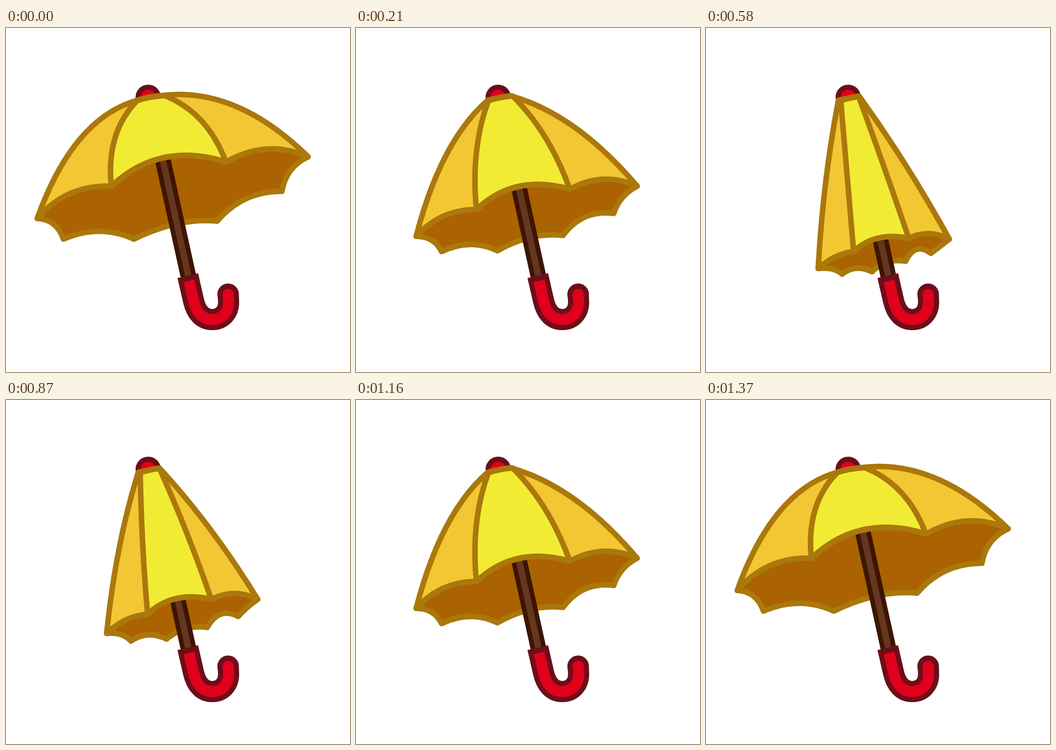
These frames come from a looping animation (748 px wide and 748 px high, 1660 ms). An HTML page without scripts:

```html
<!DOCTYPE html>
<html lang="en">
<head>
<meta charset="utf-8">
<title>Umbrella</title>
<style>
  html, body { margin: 0; width: 100%; height: 100%; overflow: hidden; background: #fff; }
  svg { display: block; width: 100%; height: 100%; }

  .cloth { stroke: #aa780b; stroke-width: 12; stroke-linejoin: round; }
  .cloth, .line { animation: 1.66s -4ms infinite; }
  .line { fill: none; }
  .dark { stroke: #6b0f1a; }
  .red { stroke: #e1001b; }

  #inside { fill: #ab6200; animation-name: inside; }
  #canopy { fill: #f3c733; animation-name: canopy; }
  #panel { fill: #f2eb34; animation-name: panel; }

  /* fold in 14 steps, hold, unfold in 14 steps, hold */
  @keyframes inside {
    0%, 82.5%, 100% {
      d: path("M68 414 Q110 416 125 459 Q205 425 278 459 Q375 412 459 420 Q514 355 600 355 Q609 302 657 280 Q311 150 68 414 Z");
      animation-timing-function: steps(14);
    }
    35%, 47.5% {
      d: path("M244 523 Q278 519 296 535 Q325 512 361 530 Q390 500 434 507 Q455 464 489 490 Q509 475 529 459 Q311 150 244 523 Z");
      animation-timing-function: steps(14);
    }
  }
  @keyframes canopy {
    0%, 82.5%, 100% {
      d: path("M68 414 Q146 196 286 157 Q311 149 337 147 Q500 126 657 280 Q567 241 479 291 Q333 246 231 344 Q132 340 68 414 Z");
      animation-timing-function: steps(14);
    }
    35%, 47.5% {
      d: path("M244 523 Q254 334 288 157 Q311 152 333 148 Q440 297 529 459 Q484 436 442 457 Q367 442 321 486 Q280 491 244 523 Z");
      animation-timing-function: steps(14);
    }
  }
  @keyframes panel {
    0%, 82.5%, 100% {
      d: path("M285 158 Q217 228 229 344 Q333 246 478 291 Q438 184 345 147 Q311 149 285 158 Z");
      animation-timing-function: steps(14);
    }
    35%, 47.5% {
      d: path("M293 158 Q307 322 321 486 Q367 442 441 457 Q388 302 332 149 Q311 152 293 158 Z");
      animation-timing-function: steps(14);
    }
  }
</style>
</head>
<body>
<svg viewBox="0 0 748 748" role="img" aria-label="An umbrella folding and opening">
  <path d="M287.5 154 A22 22 0 0 1 330.5 145" fill="#e1001b" class="dark" stroke-width="11"/>
  <path id="inside" class="cloth"/>

  <g class="line">
    <path d="M330.5 239 L397.5 544" stroke="#3d1500" stroke-width="34"/>
    <path d="M330.5 239 L397.5 544" stroke="#653620" stroke-width="14"/>
    <path class="dark" stroke-width="46" d="M395.3 538.5 L408 594 C414 619 428 634 448 634 C470 634 484 618 484 596 Q484 588 483 579"/>
    <circle cx="483" cy="579" r="23.5" fill="#6b0f1a"/>
    <path class="red" stroke-width="24" d="M398 550 L408 594 C414 619 428 634 448 634 C470 634 484 618 484 596 Q484 588 483 579"/>
    <circle cx="483" cy="579" r="12" fill="#e1001b"/>
  </g>

  <path id="canopy" class="cloth"/>
  <path id="panel" class="cloth"/>
</svg>
</body>
</html>
```
